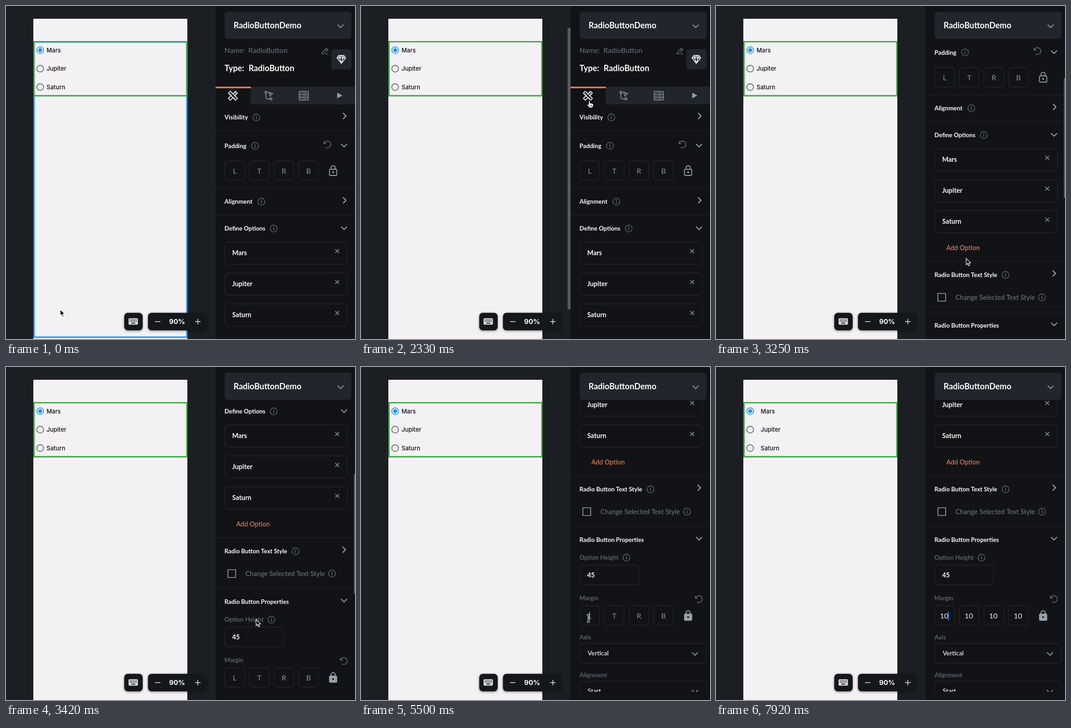
Animation, 766 px wide and 731 px high, one loop 8000 ms. Source, as an HTML page with a canvas:

```html
<!DOCTYPE html>
<html lang="en">
<head>
<meta charset="utf-8">
<title>Radio button settings</title>
<style>
html, body { margin: 0; width: 100%; height: 100%; overflow: hidden; background: #1b1f24; }
canvas { display: block; width: 766px; height: 731px; }
</style>
</head>
<body>
<canvas id="stage"></canvas>
<script>
const W = 766, H = 731, LOOP = 8000;
const canvas = document.getElementById('stage');
const c = canvas.getContext('2d');
const dpr = window.devicePixelRatio || 1;
canvas.width = W * dpr;
canvas.height = H * dpr;

const PANEL = '#111316', CARD = '#21262c', LINE = '#24272b';
const WHITE = '#fbfbfc', GREY = '#6b747d', SOFT = '#97a1ab', BLUE = '#2390f2', ORANGE = '#ee7c51';
const LATO = 'Lato, sans-serif', INTER = 'Inter, sans-serif';
const PLANETS = ['Mars', 'Jupiter', 'Saturn'];

const SCROLL = { from: 3130, to: 3930, dist: 527 };
const CLICK = 5250, TYPE1 = 6420, TYPE2 = 6670;
// time, x, y of the pointer hot spot
const PATH = [
  [110, 119, 666], [940, 290, 147], [1130, 290, 147], [1880, 501, 208],
  [2430, 501, 208], [2960, 549, 554], [4280, 549, 554], [4900, 499, 552]
];

const clamp = v => Math.max(0, Math.min(1, v));
const ramp = (t, a, b) => clamp((t - a) / (b - a));
const smooth = p => p * p * (3 - 2 * p);

function pointerAt(t) {
  let [, x, y] = PATH[0];
  for (let i = 1; i < PATH.length; i++) {
    const [t0, x0, y0] = PATH[i - 1], [t1, x1, y1] = PATH[i];
    if (t < t0) break;
    const p = smooth(ramp(t, t0, t1));
    x = x0 + (x1 - x0) * p;
    y = y0 + (y1 - y0) * p;
  }
  return { x, y };
}

function scrollAt(t) {
  return Math.round(SCROLL.dist * (1 - (1 - ramp(t, SCROLL.from, SCROLL.to)) ** 3));
}

// y is the middle of the capitals
function text(s, x, y, size, color, weight = 700, font = LATO, align = 'left') {
  c.font = `${weight} ${size}px ${font}`;
  c.textAlign = align;
  c.fillStyle = color;
  c.fillText(s, x, y + size * 0.36);
}

function box(x, y, w, h, r, fill, stroke, lw = 1.3) {
  c.beginPath();
  c.roundRect(x, y, w, h, r);
  if (fill) { c.fillStyle = fill; c.fill(); }
  if (stroke) { c.strokeStyle = stroke; c.lineWidth = lw; c.stroke(); }
}

function rect(x, y, w, h, color) {
  c.fillStyle = color;
  c.fillRect(x, y, w, h);
}

function ring(x, y, r, color, lw) {
  c.beginPath();
  c.arc(x, y, r, 0, Math.PI * 2);
  c.strokeStyle = color;
  c.lineWidth = lw;
  c.stroke();
}

function disc(x, y, r, color) {
  c.beginPath();
  c.arc(x, y, r, 0, Math.PI * 2);
  c.fillStyle = color;
  c.fill();
}

// strokes or fills SVG path data with its zero at x, y
function shape(d, x, y, { stroke, fill, lw = 1.6, rot = 0 } = {}) {
  c.save();
  c.translate(x, y);
  c.rotate(rot);
  const p = new Path2D(d);
  c.lineWidth = lw;
  c.lineJoin = 'round';
  if (fill) { c.fillStyle = fill; c.fill(p); }
  if (stroke) { c.strokeStyle = stroke; c.stroke(p); }
  c.restore();
}

const down = (x, y, color = '#a9b2bb') => shape('M-6.5 -3.2L0 3.3L6.5 -3.2', x, y, { stroke: color, lw: 1.8 });
const right = (x, y) => shape('M-3.2 -6.5L3.3 0L-3.2 6.5', x, y, { stroke: '#a9b2bb', lw: 1.8 });
const cross = (x, y) => shape('M-4.3 -4.3L4.3 4.3M4.3 -4.3L-4.3 4.3', x, y, { stroke: SOFT, lw: 1.4 });
const undo = (x, y) => shape('M-7.5 -7V-2H-2.5M-7 -2.4A7.4 7.4 0 1 1 -4 6.2', x, y, { stroke: GREY, lw: 1.5 });
const rule = y => rect(460, y - 0.5, 306, 1, '#22252a');

function info(x, y) {
  ring(x, y, 7.6, GREY, 1.3);
  rect(x - 0.8, y - 1.5, 1.6, 5.2, GREY);
  rect(x - 0.8, y - 4.2, 1.6, 1.7, GREY);
}

function lock(x, y, open) {
  const shackle = open ? 'M-4.6 -5V-6.8A4.6 4.6 0 0 1 4.6 -6.8V-4' : 'M-4.8 -3.5V-6.2A4.8 4.8 0 0 1 4.8 -6.2V-3.5';
  shape(shackle, x, y, { stroke: SOFT, lw: 2 });
  box(x - 8, y - 3.5, 16, 13.5, 1.5, open ? null : SOFT, SOFT, 1.8);
  disc(x, y + 3, 2.1, open ? SOFT : PANEL);
}

function sides(y, values) {
  'LTRB'.split('').forEach((s, i) => {
    const x = 480 + i * 54;
    box(x, y, 43.5, 43, 7, null, LINE);
    if (values) text(values, x + 20.7, y + 22.5, 16, '#eceef0', 400, LATO, 'center');
    else text(s, x + 22, y + 22.5, 16, '#89929b', 400, LATO, 'center');
  });
}

function tabs() {
  rect(537, 177, 229, 39, CARD);
  rect(460, 177, 77.5, 3.5, ORANGE);
  // crossed ruler and pencil
  for (const rot of [Math.PI / 4, -Math.PI / 4]) {
    shape('M-3 -11H3V11H-3Z', 498, 197, { stroke: WHITE, fill: PANEL, lw: 1.7, rot });
  }
  shape('M-3 -7H0M-3 -3.5H0M-3 3.5H0M-3 7H0', 498, 197, { stroke: WHITE, lw: 1.3, rot: -Math.PI / 4 });
  shape('M-3 -7.5H3', 498, 197, { stroke: WHITE, lw: 1.3, rot: Math.PI / 4 });
  // flow
  ring(570.5, 189.5, 2.3, SOFT, 1.5);
  ring(581.5, 204, 2.3, SOFT, 1.5);
  shape('M-6.5 -5V3Q-6.5 7 -2.5 7H2', 577, 197, { stroke: SOFT, lw: 1.5 });
  shape('M-1 -8L8.5 -4.5L4.5 -2.8L3 1.5Z', 577, 197, { stroke: SOFT, lw: 1.4 });
  // storage
  box(643.5, 187.5, 20, 19, 2, null, SOFT, 1.5);
  for (const y of [190.7, 197, 203.3]) {
    disc(647.5, y, 1, SOFT);
    rect(651, y - 0.6, 9, 1.2, SOFT);
  }
  rect(643.5, 193.2, 20, 1.4, SOFT);
  rect(643.5, 199.6, 20, 1.4, SOFT);
  shape('M-5 -6.2L6 0L-5 6.2Z', 732, 196.5, { fill: SOFT });
}

function content(t) {
  text('Name:', 479.5, 97, 15.7, GREY, 400);
  text('RadioButton', 532, 97.5, 15.7, GREY, 400);
  shape('M-6.5 6.5L-5.7 2.4L3.3 -6.5L6.7 -3.2L-2.4 5.7ZM1 -4.3L4.3 -1M1.5 6.5H7', 700, 99, { stroke: GREY, lw: 1.3 });
  text('Type:', 479.5, 136.5, 18, WHITE);
  text('RadioButton', 532.5, 136.5, 18, WHITE);
  box(714, 95, 44, 44, 6, CARD);
  shape('M-5.5 -8.5H5.5L9.5 -3L0 9L-9.5 -3ZM-9.5 -3H9.5M-5.5 -8.5L-3.8 -3L0 9L3.8 -3L5.5 -8.5M-3.8 -3L0 -8.5L3.8 -3', 736, 117, { stroke: WHITE, lw: 1.5 });
  tabs();

  text('Visibility', 479.5, 244.5, 13.4, WHITE);
  info(549.5, 244.5);
  right(743, 241.5);
  rule(273.5);

  text('Padding', 479.5, 307, 13.4, WHITE);
  info(546.5, 307);
  undo(705.5, 304);
  down(742, 306);
  sides(340);
  lock(718, 362, true);
  rule(400.5);

  text('Alignment', 479.5, 429.5, 13.4, WHITE);
  info(560.5, 429.5);
  right(743, 426.5);
  rule(459);

  text('Define Options', 479.5, 488.5, 13.2, WHITE);
  info(587.5, 488.5);
  down(742, 487.5);
  PLANETS.forEach((s, i) => {
    const y = 518 + i * 68;
    box(480, y, 269.5, 49, 8, null, LINE);
    text(s, 496.5, y + 23.5, 14.4, WHITE);
    cross(727, y + 20);
  });
  text('Add Option', 505.5, 735.5, 14.3, ORANGE, 500);
  rule(766);

  text('Radio Button Text Style', 479.5, 795.5, 13.2, WHITE);
  info(635.5, 795.5);
  right(742, 792);
  box(487, 836, 17, 17, 0.5, null, SOFT, 1.7);
  text('Change Selected Text Style', 525.5, 844.5, 14.7, GREY, 500);
  info(715.5, 844.5);
  rule(877);

  text('Radio Button Properties', 479.5, 906.5, 13.2, WHITE);
  down(742, 903.5);
  text('Option Height', 479.5, 945.5, 13.6, GREY, 500);
  info(582.5, 945.5);
  box(480, 962, 129.5, 43, 7, null, LINE);
  text('45', 496.5, 983.5, 14.4, WHITE);

  text('Margin', 479.5, 1034.5, 13.4, GREY, 500);
  undo(741.5, 1036.5);
  const typed = t >= TYPE2 ? '10' : t >= TYPE1 ? '1' : '';
  sides(1051, typed);
  lock(718, 1073, false);
  const since = t >= TYPE2 ? TYPE2 : t >= TYPE1 ? TYPE1 : CLICK;
  if (t >= since && (t - since) % 1000 < 500) {
    rect(501 + typed.length * 4.1, 1064, 1.8, 19, BLUE);
  }

  text('Axis', 479.5, 1120.5, 13.6, GREY, 500);
  select('Vertical', 1134);
  text('Alignment', 479.5, 1203.5, 13.5, GREY, 500);
  select('Start', 1217);
}

function select(s, y) {
  box(480, y, 277.5, 43, 7, null, LINE);
  text(s, 497.5, y + 21.5, 13.8, WHITE, 500);
  down(733, y + 22.5, SOFT);
}

function panel(t, scroll) {
  rect(460, 0, 306, H, PANEL);
  c.save();
  c.beginPath();
  c.rect(460, 72, 306, 641);
  c.clip();
  c.translate(0, -scroll);
  content(t);
  c.restore();
  box(480, 12.5, 278, 59.5, 6, CARD);
  text('RadioButtonDemo', 499.5, 42.5, 18, WHITE);
  down(734.5, 44, SOFT);
  c.globalAlpha = Math.min(ramp(t, 3130, 3200), 1 - ramp(t, 4450, 4700));
  rect(763.5, 74 + scroll * 0.41, 2.5, 263, '#5b5f63');
  c.globalAlpha = 1;
}

function phone(t, hover) {
  rect(60, 28, 338, H - 28, '#f3f1f4');
  if (hover) box(61.5, 79, 335.5, 648, 0, null, BLUE, 3);
  box(61.5, 78.3, 335.5, 118.7, 0, null, '#3ca63f', 2.8);
  const shift = t >= TYPE2 ? 9 : t >= TYPE1 ? 0.9 : 0;
  PLANETS.forEach((s, i) => {
    const y = 97 + i * 40.5;
    ring(75, y, 7.4, i ? '#5f6063' : BLUE, 1.7);
    if (!i) disc(75, y, 4.4, BLUE);
    text(s, 89 + shift, y, 13, '#101113', 500, INTER);
  });
}

function toolbar() {
  c.shadowColor = 'rgba(0,0,0,.45)';
  c.shadowBlur = 5 * dpr;
  c.shadowOffsetY = 1.5 * dpr;
  box(259.5, 673.5, 40.5, 38.5, 8, '#15181b');
  box(311.5, 673.5, 129, 38.5, 8, '#15181b');
  c.shadowColor = 'transparent';
  box(269, 685.5, 20.5, 14, 2, '#d9dbdd');
  for (let row = 0; row < 2; row++) {
    for (let i = 0; i < 5; i++) rect(271.7 + i * 3.3, 688 + row * 3.2, 1.8, 1.8, '#15181b');
  }
  rect(275, 695.2, 8.6, 1.9, '#15181b');
  rect(327, 692, 12, 1.6, '#d9dbdd');
  text('90%', 375.5, 693, 15, WHITE, 700, INTER, 'center');
  rect(415, 692, 12, 1.6, '#d9dbdd');
  rect(420.2, 686.8, 1.6, 12, '#d9dbdd');
}

function overField(x, y) {
  const inside = (x0, w, y0, h) => x >= x0 && x <= x0 + w && y >= y0 && y <= y0 + h;
  if (PLANETS.some((_, i) => inside(480, 230, 518 + i * 68, 49))) return true;
  if (inside(480, 130, 962, 43)) return true;
  return [0, 1, 2, 3].some(i => inside(480 + i * 54, 43, 340, 43) || inside(480 + i * 54, 43, 1051, 43));
}

function cursor({ x, y }, scroll) {
  const docY = y + scroll;
  if (x > 460 && docY > 177 && docY < 216) {
    shape('M-1.5 1Q0 -1.3 1.5 1V5.2Q3.2 4 4.3 5.7Q6 4.7 7 6.4Q9 5.8 9 8V10.5Q8.6 12.5 7.6 14V15.5H-.8V14.3Q-3 11.7 -5.2 8.7Q-4.8 6.3 -2.6 7.8L-1.5 9Z', x, y, { fill: '#fff', stroke: '#000', lw: 1.1 });
    shape('M1.6 9.5V13M3.6 9.5V13M5.6 9.5V13', x, y, { stroke: '#000', lw: 0.8 });
  } else if (x > 460 && overField(x, docY)) {
    const d = 'M-3.5 -8Q-.5 -8 0 -6Q.5 -8 3.5 -8M0 -6V6M-3.5 8Q-.5 8 0 6Q.5 8 3.5 8M-2 3H2';
    shape(d, x, y, { stroke: '#fff', lw: 3 });
    shape(d, x, y, { stroke: '#000', lw: 1.1 });
  } else {
    shape('M0 0V14L3.2 11L5.4 16.2L7.8 15.2L5.6 10.2H10Z', x, y, { fill: '#000', stroke: '#fff', lw: 1.2 });
  }
}

function draw(t) {
  const p = pointerAt(t), scroll = scrollAt(t);
  c.setTransform(dpr, 0, 0, dpr, 0, 0);
  rect(0, 0, W, H, '#1b1f23');
  phone(t, p.x < 398 && p.y > 198);
  c.globalAlpha = Math.min(ramp(t, 1740, 1800), 1 - ramp(t, 2650, 2850));
  rect(453.5, 48, 6.5, 617.5, '#595b5e');
  c.globalAlpha = 1;
  toolbar();
  panel(t, scroll);
  if (t < TYPE1) cursor(p, scroll);
}

const start = performance.now();
function tick() {
  draw((performance.now() - start) % LOOP);
  requestAnimationFrame(tick);
}
tick();
</script>
</body>
</html>
```
